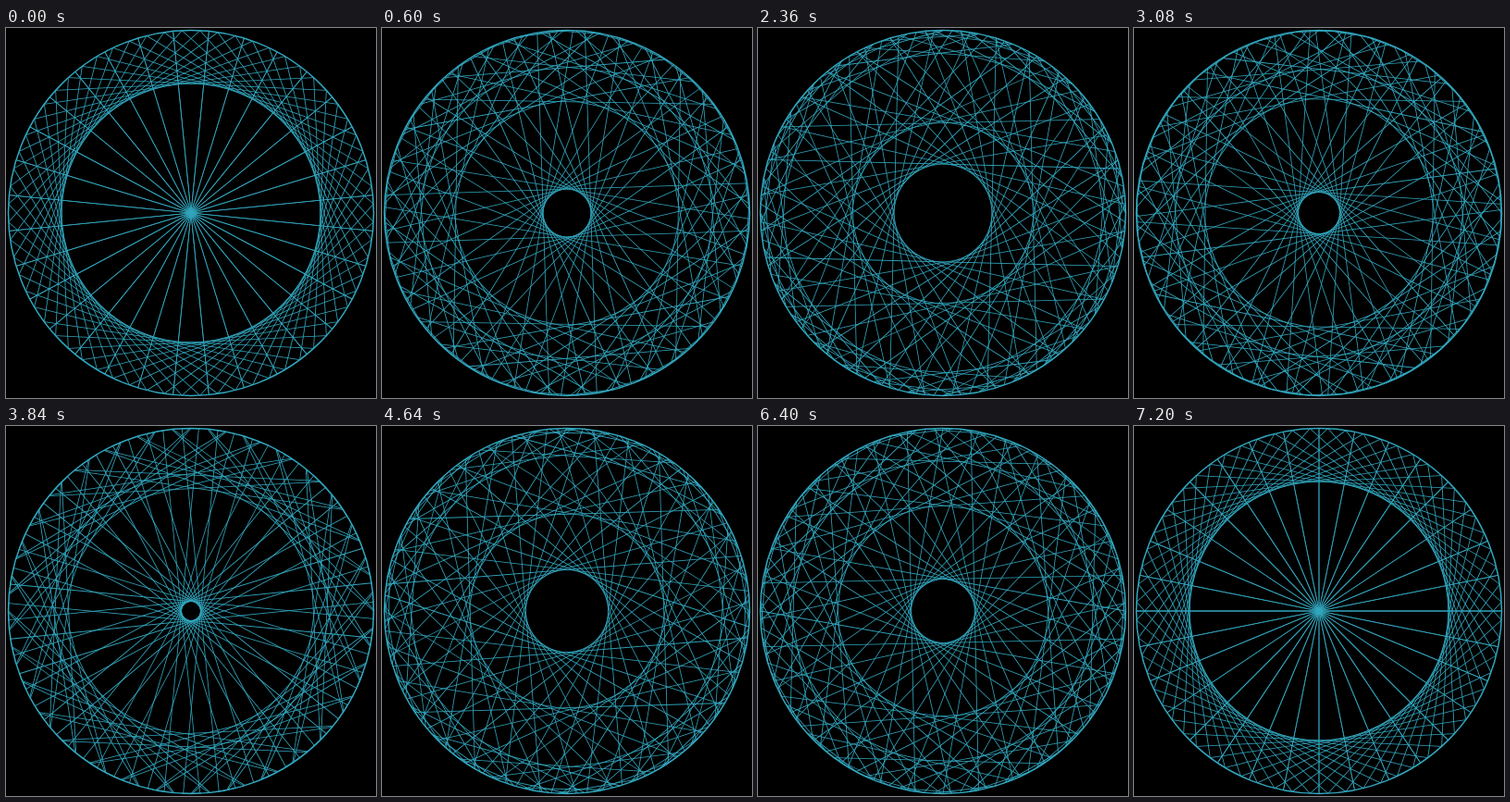
Write an HTML page with a canvas that moves like this. It is 400 px wide and 400 px high and loops after 7240 ms.

```html
<!DOCTYPE html>
<html lang="en">
<head>
<meta charset="utf-8">
<title>Chords on a circle</title>
<style>
  html, body { margin: 0; width: 100%; height: 100%; overflow: hidden; background: #000; }
  canvas { display: block; width: 400px; height: 400px; }
</style>
</head>
<body>
<canvas id="stage" width="400" height="400"></canvas>
<script>
const ctx = document.getElementById('stage').getContext('2d');
const TAU = Math.PI * 2;
const STEP = 40, STEPS = 181;
const CENTER = 200, RADIUS = 197.5;
const POINTS = 128, FACTOR = 33;

function pointAt(angle) {
  return [CENTER + RADIUS * Math.cos(angle), CENTER - RADIUS * Math.sin(angle)];
}

function chord(from, to) {
  ctx.beginPath();
  ctx.moveTo(...pointAt(from));
  ctx.lineTo(...pointAt(to));
  ctx.stroke();
}

// Each point k is joined to point FACTOR * k, turned by one degree per step.
function draw(step) {
  const turn = step * TAU / 360;
  ctx.globalCompositeOperation = 'source-over';
  ctx.fillStyle = '#000';
  ctx.fillRect(0, 0, 400, 400);

  // Lighten keeps chords that lie on top of each other as thin as single ones.
  ctx.globalCompositeOperation = 'lighten';
  ctx.strokeStyle = 'rgb(48, 166, 190)';
  ctx.lineWidth = 0.8;
  for (let k = 0; k < POINTS; k++) {
    const angle = k * TAU / POINTS;
    chord(angle, angle * FACTOR + turn);
  }

  ctx.lineWidth = 1.5;
  ctx.beginPath();
  ctx.arc(CENTER, CENTER, RADIUS, 0, TAU);
  ctx.stroke();
}

const start = performance.now();
function tick() {
  const elapsed = Math.max(0, performance.now() - start);
  draw(Math.floor(elapsed / STEP) % STEPS);
  requestAnimationFrame(tick);
}
draw(0);
requestAnimationFrame(tick);
</script>
</body>
</html>
```
